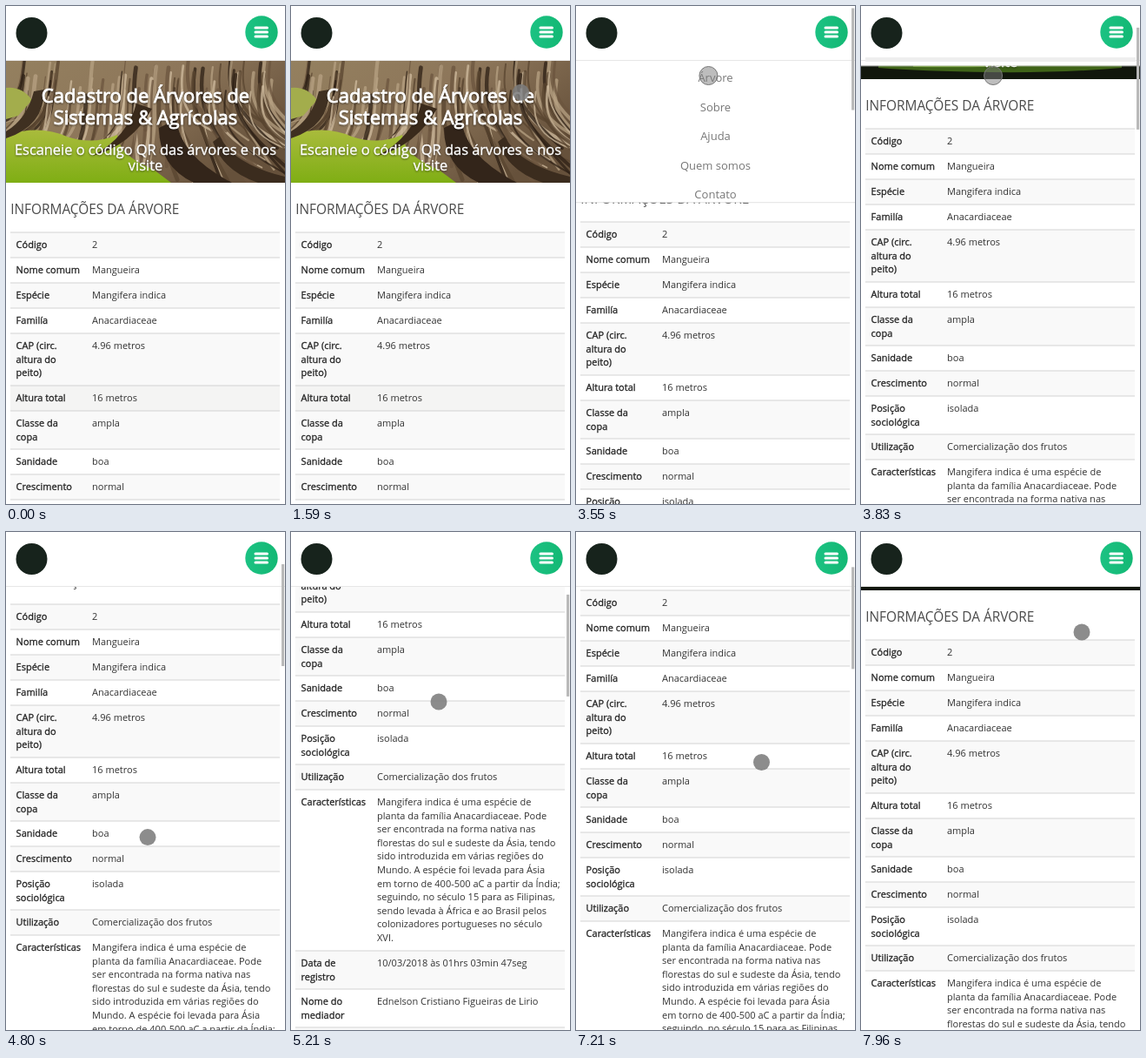
An HTML page for the animation above (8 s loop, 321x572 px).

```html
<!DOCTYPE html>
<html lang="pt">
<head>
<meta charset="utf-8">
<title>Cadastro de Árvores</title>
<style>
  html, body { margin: 0; width: 100%; height: 100%; overflow: hidden; background: #fff; }
  svg { display: block; width: 321px; height: 572px; }
  text { font-family: "Open Sans", "Noto Sans", sans-serif; font-size: 11px; fill: #333; }
  .label { fill: #222; stroke: #222; stroke-width: .3px; }
  .heading { font-size: 15.4px; fill: #4a4a4a; }
  .hero text { fill: #fff; text-anchor: middle; stroke: #fff; }
  .hero .title { font-size: 22px; stroke-width: .9px; }
  .hero .sub { font-size: 16.4px; stroke-width: .35px; }
  .captions { filter: drop-shadow(0 1px 1px #0007); }
  .menu text { font-size: 13px; fill: #777; text-anchor: middle; }
</style>
</head>
<body>
<svg viewBox="0 0 321 572">
  <defs>
    <clipPath id="heroClip"><rect y="63" width="321" height="140"/></clipPath>
    <clipPath id="menuClip"><rect id="menuWindow" y="62" width="321" height="0"/></clipPath>
    <linearGradient id="bark" x2="1" y2=".6">
      <stop stop-color="#94805f"/><stop offset=".5" stop-color="#8d765a"/><stop offset="1" stop-color="#66513b"/>
    </linearGradient>
    <linearGradient id="grass" x2="0" y2="1">
      <stop stop-color="#a9bb3c"/><stop offset="1" stop-color="#7fae14"/>
    </linearGradient>
    <linearGradient id="button">
      <stop stop-color="#1cc283"/><stop offset="1" stop-color="#13b874"/>
    </linearGradient>
  </defs>
  <rect width="321" height="572" fill="#fff"/>
  <g id="page">
    <g class="hero" clip-path="url(#heroClip)">
      <g id="roots">
        <rect y="63" width="321" height="140" fill="url(#bark)"/>
        <g id="strands" fill="none" stroke-linecap="round"></g>
        <path d="M0 94Q18 92 30 108L14 126L0 130Z" fill="#a3ad4c"/>
        <path d="M0 148Q40 136 70 150Q100 160 128 148Q130 172 170 188L190 203H0Z" fill="url(#grass)"/>
        <path d="M44 96Q44 138 0 152V144Q24 130 32 98Z" fill="#3f3021"/>
        <path d="M150 112Q140 150 100 172Q144 160 168 118Z" fill="#3a2a1b"/>
        <path d="M196 130Q200 172 260 203H216Q176 184 176 140Z" fill="#33251a"/>
        <path d="M246 150Q262 182 321 196V203H290Q250 190 238 156Z" fill="#3b2c1e"/>
      </g>
      <g id="lawn">
        <rect y="63" width="321" height="140" fill="#11170c"/>
        <ellipse cx="90" cy="92" rx="110" ry="34" fill="#263a14"/>
        <ellipse cx="250" cy="98" rx="90" ry="36" fill="#304918"/>
        <path d="M20 176Q160 164 300 176V190Q230 196 150 195T20 190Z" fill="#3f6418"/>
        <path d="M60 178Q150 170 250 180Q200 191 60 189Z" fill="#6a962a"/>
      </g>
      <g class="captions">
        <text class="title" x="160.500" y="111">Cadastro de Árvores de</text>
        <text class="title" x="160.500" y="136">Sistemas &amp; Agrícolas</text>
        <text class="sub" x="160.500" y="171">Escaneie o código QR das árvores e nos</text>
        <text class="sub" x="160.500" y="189">visite</text>
      </g>
    </g>
    <text class="heading" x="5.200" y="238.500">INFORMAÇÕES DA ÁRVORE</text>
    <g id="table"></g>
  </g>
  <g class="menu" clip-path="url(#menuClip)">
    <rect y="62" width="321" height="182" fill="#fff"/>
    <g id="items"></g>
  </g>
  <rect id="menuEdge" width="321" height="1" fill="#e2e2e2"/>
  <rect width="321" height="62" fill="#fff"/>
  <rect y="62" width="321" height="1" fill="#e7e7e7"/>
  <rect id="band" x="5" y="59" width="311" height="5" fill="#eee"/>
  <circle cx="29.500" cy="31" r="18" fill="#17231c"/>
  <circle cx="294" cy="30" r="18.700" fill="url(#button)"/>
  <path d="M287 25H300.500M287 30H300.500M287 35H300.500" stroke="#fff" stroke-width="3" stroke-linecap="round"/>
  <rect id="focus" x="275.500" y="11.500" width="37" height="37" fill="none" stroke="#efae3a"/>
  <rect id="bar" x="317" width="3.200" height="117" fill="#b9b9b9"/>
  <circle id="cursor" r="9.500" fill="#7c7c7c" stroke="#777"/>
</svg>
<script>
const $ = id => document.getElementById(id);
const LOOP = 8000, MENU_HEIGHT = 180;

const rows = [
  ['Código', '2'],
  ['Nome comum', 'Mangueira'],
  ['Espécie', 'Mangifera indica'],
  ['Familía', 'Anacardiaceae'],
  ['CAP (circ.|altura do|peito)', '4.96 metros'],
  ['Altura total', '16 metros'],
  ['Classe da|copa', 'ampla'],
  ['Sanidade', 'boa'],
  ['Crescimento', 'normal'],
  ['Posição|sociológica', 'isolada'],
  ['Utilização', 'Comercialização dos frutos'],
  ['Características', 'Mangifera indica é uma espécie de|planta da família Anacardiaceae. Pode|' +
    'ser encontrada na forma nativa nas|florestas do sul e sudeste da Ásia, tendo|' +
    'sido introduzida em várias regiões do|Mundo. A espécie foi levada para Ásia|' +
    'em torno de 400-500 aC a partir da Índia;|seguindo, no século 15 para as Filipinas,|' +
    'sendo levada à África e ao Brasil pelos|colonizadores portugueses no século|XVI.'],
  ['Data de|registro', '10/03/2018 às 01hrs 03min 47seg'],
  ['Nome do|mediador', 'Ednelson Cristiano Figueiras de Lirio'],
  ['', '']
];

function cell(text, x, top, cls) {
  return text.split('|').map((line, i) =>
    `<text class="${cls}" x="${x}" y="${top + 18 + Math.round(i * 15.6)}">${line}</text>`).join('');
}

function buildTable() {
  let top = 260, html = '';
  rows.forEach(([label, value], i) => {
    const lines = Math.max(label.split('|').length, value.split('|').length);
    const height = Math.round(28.8 + 15.6 * (lines - 1));
    html += `<rect id="row${i}" x="5" y="${top}" width="310" height="${height}" fill="${i % 2 ? '#fff' : '#f9f9f9'}"/>` +
      `<rect x="5" y="${top - .5}" width="310" height="1" fill="#d4d4d4"/>` +
      cell(label, 11.6, top, 'label') + cell(value, 99, top, 'value');
    top += height;
  });
  $('table').innerHTML = html;
}

function buildStrands() {
  let seed = 11, html = '';
  const random = () => (seed = seed * 16807 % 2147483647) / 2147483647;
  const tones = ['#2c1f14', '#58442f', '#b7a283', '#d0bd9f', '#6b553e'];
  for (let i = 0; i < 85; i++) {
    const x = 20 + random() * 300, y = 58 + random() * 50;
    const end = x + (x - 170) * .7 + random() * 30 - 15;
    html += `<path d="M${x} ${y}C${x - 6} ${y + 40} ${x + 4} ${y + 60} ${end} ${y + 70 + random() * 60}" ` +
      `stroke="${tones[i % 5]}" stroke-width="${1 + random() * 4}" opacity=".75"/>`;
  }
  $('strands').innerHTML = html;
}

const ramp = (t, from, to) => Math.min(1, Math.max(0, (t - from) / (to - from)));
const swing = p => .5 - Math.cos(p * Math.PI) / 2;

// Keys are [time, ...values], interpolated linearly.
function track(keys, t) {
  const next = keys.findIndex(key => key[0] > t);
  if (next < 0) return keys[keys.length - 1].slice(1);
  if (next === 0) return keys[0].slice(1);
  const a = keys[next - 1], b = keys[next], p = ramp(t, a[0], b[0]);
  return a.slice(1).map((v, i) => v + (b[i + 1] - v) * p);
}

const cursorKeys = [
  [260, 248, 522], [410, 262, 381], [1000, 262, 381], [1350, 231, 200], [1740, 285, 37],
  [2330, 285, 37], [2640, 151, 102], [2890, 151, 102], [3090, 153, 80], [3880, 152, 80],
  [4060, 166, 150], [4240, 166, 150], [4520, 166, 399], [4799, 166, 399], [4800, 163, 351],
  [5210, 170, 195], [6340, 170, 195], [6570, 220, 104], [6949, 220, 104], [6950, 220, 121],
  [7310, 211, 319], [7620, 211, 319], [7960, 254, 115]
];
const dragKeys = [[4799, 148], [4800, 177], [5210, 344], [6949, 344], [6950, 342], [7310, 136]];
const barKeys = [
  [3449, 0], [3450, 1], [4240, 1], [4500, 0], [4799, 0], [4800, 1],
  [5600, 1], [5780, 0], [6949, 0], [6950, 1], [7620, 1], [7820, 0]
];

const show = (id, on) => $(id).setAttribute('visibility', on ? 'visible' : 'hidden');

function render(t) {
  const scroll = Math.round(t < 4400 ? 148 * swing(ramp(t, 3450, 3990)) : track(dragKeys, t)[0]);
  $('page').setAttribute('transform', `translate(0 ${-scroll})`);
  show('roots', t < 3000);
  show('lawn', t >= 3000);
  $('row5').setAttribute('fill', t < 2200 ? '#f4f4f3' : '#fff');

  const open = swing(ramp(t, 2200, 2600)) - swing(ramp(t, 3470, 3880));
  const height = MENU_HEIGHT * open;
  $('menuWindow').setAttribute('height', height);
  $('menuEdge').setAttribute('y', 62 + height);
  show('menuEdge', height > 0);
  show('band', t > 3500 && height > 0 && height < 12);
  show('focus', t >= 2200 && t < 3450);

  $('bar').setAttribute('y', scroll * .209);
  $('bar').setAttribute('opacity', track(barKeys, t)[0]);

  const [x, y] = track(cursorKeys, t);
  const tapping = t >= 3450 && t < 3880;
  $('cursor').setAttribute('cx', x);
  $('cursor').setAttribute('cy', y);
  $('cursor').setAttribute('r', tapping ? 10.5 : 9.5);
  $('cursor').setAttribute('fill-opacity', tapping ? .5 : .88);
  $('cursor').setAttribute('stroke-opacity', tapping ? 1 : 0);
  show('cursor', t >= 260);
}

buildTable();
buildStrands();
$('items').innerHTML = ['Árvore', 'Sobre', 'Ajuda', 'Quem somos', 'Contato'].map((name, i) =>
  `<text x="160.500" y="${Math.round(87 + i * 33.5)}">${name}</text>`).join('');

function tick() {
  render(performance.now() % LOOP);
  requestAnimationFrame(tick);
}
tick();
</script>
</body>
</html>
```
